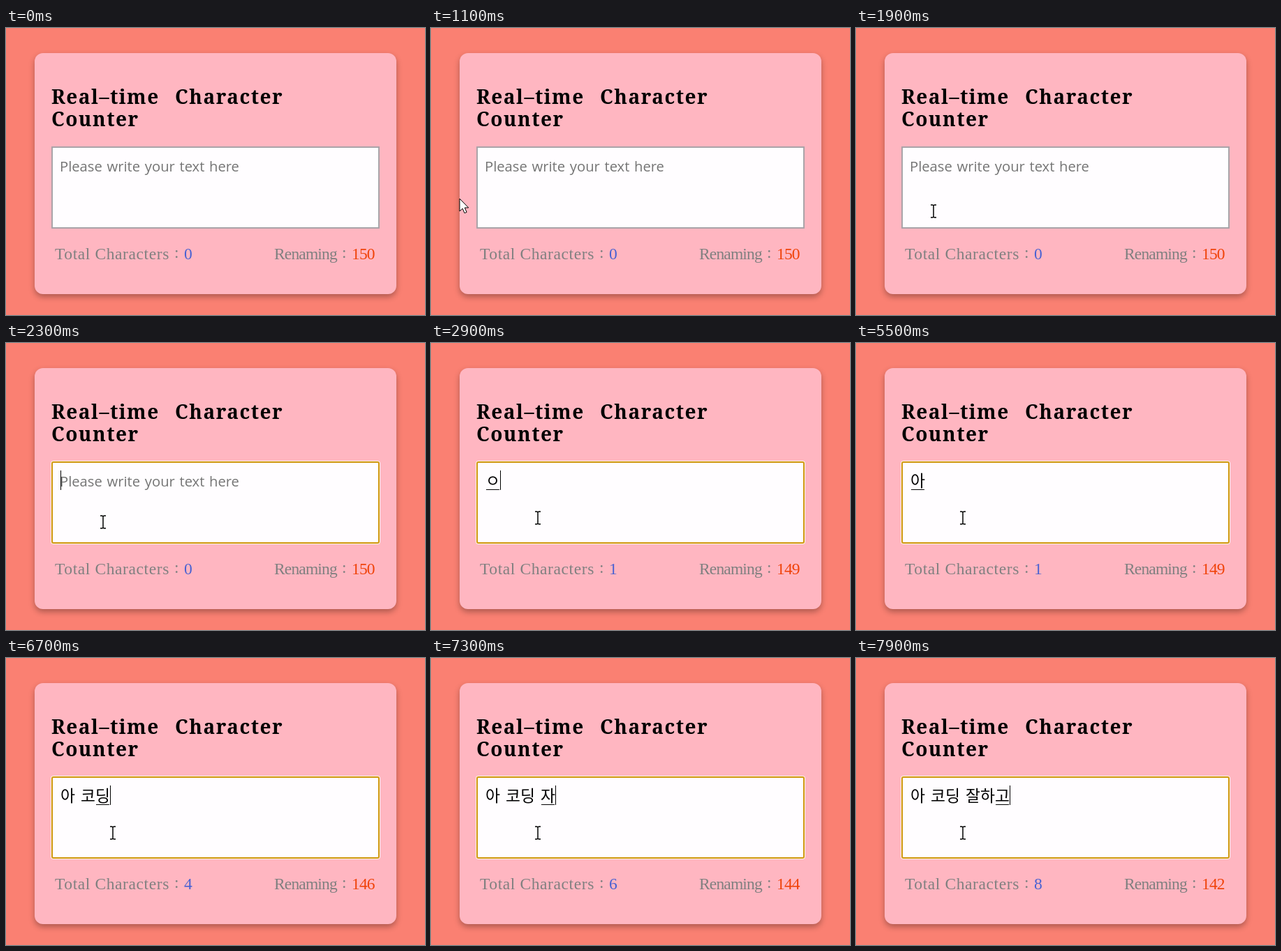
Recreate the animation shown at these times as an HTML page. Size 600x412 px, loop 8 s.

```html
<!DOCTYPE html>
<html lang="en">
<head>
<meta charset="utf-8">
<title>Real-time Character Counter</title>
<style>
  html, body { margin: 0; width: 100%; height: 100%; overflow: hidden; background: #fa8072; }
  .card, .box, svg { position: absolute; box-sizing: border-box; }
  .card {
    left: 41px; top: 36px; width: 518px; height: 346px;
    border-radius: 12px; background: #ffb6c1;
    box-shadow: 0 4px 8px rgba(0, 0, 0, .3);
  }
  .box {
    left: 65px; top: 170px; width: 470px; height: 118px;
    border: 2px solid #a9a3a8; background: #fffdff;
  }
  .box.focus {
    border-color: #d0980f; border-radius: 3px;
    box-shadow: 0 0 0 1px #fff4e6;
  }
  svg { left: 0; top: 0; width: 600px; height: 412px; }
  text { white-space: pre; }
  .title { font: bold 28px "Noto Serif", serif; letter-spacing: 1.5px; }
  .hint { font: 20.2px "Open Sans", sans-serif; word-spacing: 1.5px; fill: #757575; }
  .typed { font: 300 22.8px "Noto Sans CJK KR", "Noto Sans CJK", sans-serif; }
  .info { font: 23.5px "Liberation Serif", serif; fill: #808080; }
  .tight { letter-spacing: -.85px; }
  .total { fill: #4a62d2; }
  .left { fill: #f0430a; }
  .line { stroke: #000; fill: none; }
</style>
</head>
<body>
<div class="card"></div>
<div class="box" id="box"></div>
<svg viewBox="0 0 600 412">
  <g class="title">
    <text x="65" y="109">Real–time</text>
    <text x="242" y="109">Character</text>
    <text x="65" y="141">Counter</text>
  </g>
  <text class="hint" id="hint" x="77" y="206">Please write your text here</text>
  <text class="typed" id="typed" y="205.5"></text>
  <path class="line" id="underline"/>
  <path class="line" id="caret"/>
  <g class="info">
    <text x="70" y="332" letter-spacing=".6">Total Characters</text>
    <text x="241" y="330">:</text>
    <text class="total" id="total" x="255" y="332"></text>
    <text class="tight" x="384" y="332">Renaming</text>
    <text x="481" y="330">:</text>
    <text class="left tight" id="left" x="495" y="332"></text>
  </g>
  <path id="arrow" d="M.5.5V18.5L4.7 14.7L7.5 21.2L10.6 19.9L7.8 13.5H13.2Z" fill="#fff" stroke="#000"/>
  <path class="line" id="beam" stroke-width="1.5" d="M-4-9H-1.2L0-8L1.2-9H4M0-8V8M-4 9H-1.2L0 8L1.2 9H4"/>
</svg>
<script>
  const LOOP = 8000, LIMIT = 150, LEFT = 78, FOCUS = 2300;

  // [time, text]
  const typing = [
    [0, ''], [2800, 'ㅇ'], [4900, '아'], [6100, '아 '], [6200, '아 ㅋ'],
    [6400, '아 코'], [6500, '아 콛'], [6600, '아 코디'], [6700, '아 코딩'],
    [6900, '아 코딩 '], [7100, '아 코딩 ㅈ'], [7300, '아 코딩 자'],
    [7400, '아 코딩 잘'], [7500, '아 코딩 잟'], [7600, '아 코딩 잘하'],
    [7800, '아 코딩 잘학'], [7900, '아 코딩 잘하고']
  ];

  // [time, caret visible]
  const blink = [
    [0, false], [FOCUS, true], [3300, false], [3800, true],
    [4300, false], [4900, true], [5500, false], [6000, true]
  ];

  // [time, shape, x, y]
  const pointer = [
    [0, ''], [800, 'arrow', 24, 300], [900, 'arrow', 28, 280],
    [1000, 'arrow', 34, 260], [1100, 'arrow', 40.5, 244.5],
    [1200, 'arrow', 56, 247], [1300, 'beam', 79, 257],
    [1800, 'beam', 92, 261], [1900, 'beam', 111, 263],
    [2000, 'beam', 128, 260], [2100, 'beam', 139, 257],
    [2400, 'beam', 144, 255], [2500, 'beam', 150, 252], [2600, 'beam', 153, 251]
  ];

  const $ = id => document.getElementById(id);
  const at = (steps, t) => steps.findLast(step => step[0] <= t);
  const show = (id, on) => { $(id).style.display = on ? '' : 'none'; };

  function drawText(text, caretOn) {
    const xs = [];
    let x = LEFT;
    for (const ch of text) {
      xs.push(x);
      x += ch === ' ' ? 8 : 21;
    }
    $('typed').textContent = text;
    $('typed').setAttribute('x', xs.join(' '));
    $('total').textContent = text.length;
    $('left').textContent = LIMIT - text.length;

    const composing = text && !text.endsWith(' ');
    show('hint', !text);
    show('underline', composing);
    if (composing) $('underline').setAttribute('d', `M${x - 20} 210.5H${x - 1}`);
    show('caret', caretOn);
    $('caret').setAttribute('d', `M${x + .5} 183V211`);
  }

  function drawPointer([, shape, x, y]) {
    for (const id of ['arrow', 'beam']) {
      show(id, id === shape);
      if (id === shape) $(id).setAttribute('transform', `translate(${x} ${y})`);
    }
  }

  function frame(now) {
    const t = now % LOOP;
    $('box').classList.toggle('focus', t >= FOCUS);
    drawText(at(typing, t)[1], at(blink, t)[1]);
    drawPointer(at(pointer, t));
    requestAnimationFrame(frame);
  }
  frame(0);
</script>
</body>
</html>
```
